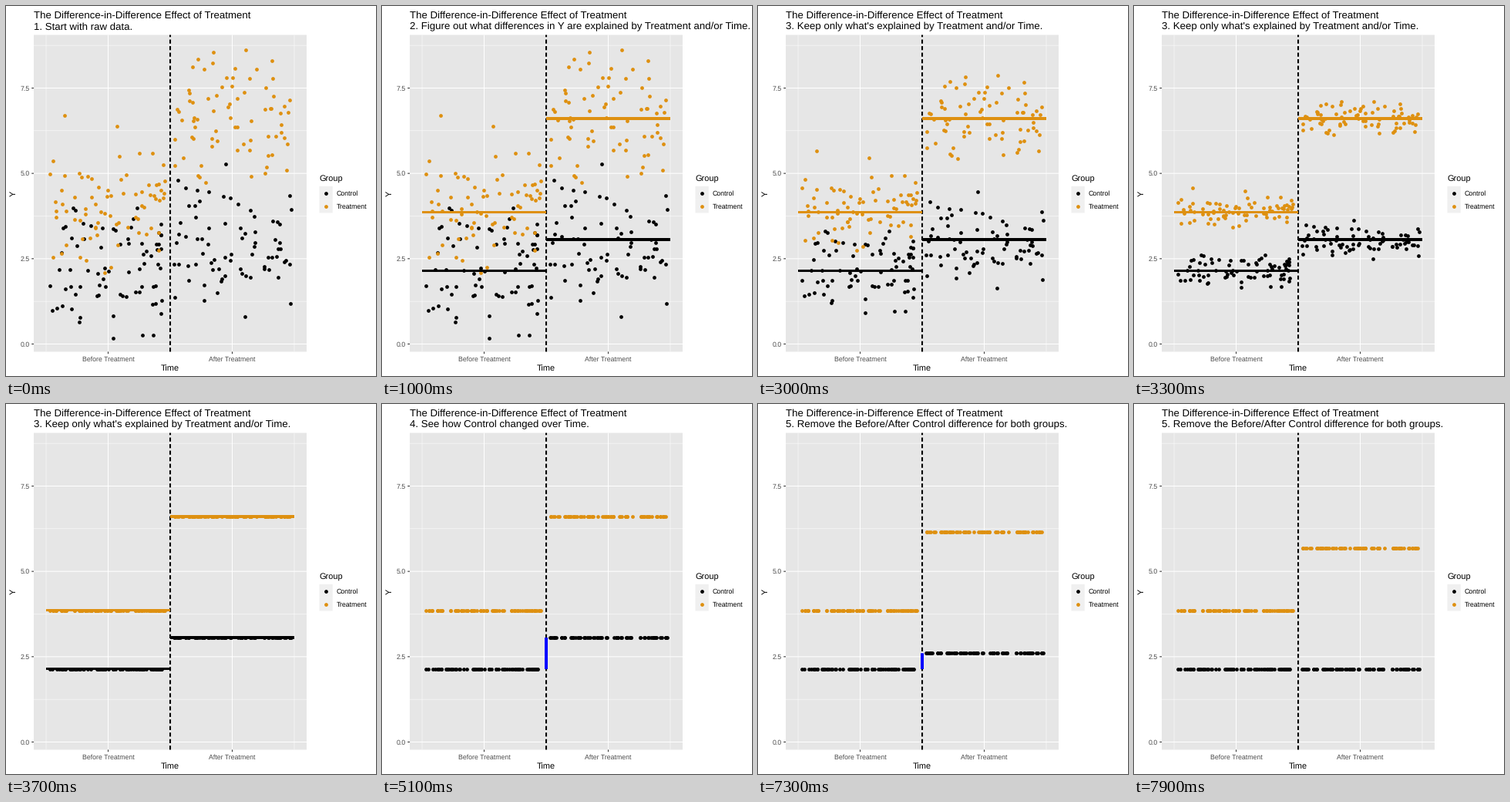
Animation of 480x480 px, one loop 8 s. Source, as a matplotlib script:

```python
import math

import matplotlib.pyplot as plt
import numpy as np
from matplotlib.animation import FuncAnimation
from matplotlib.patches import Rectangle

SIZE, STEP_MS, LOOP_MS, EASE_MS = 480, 100, 8000, 1200
BLACK, ORANGE, BLUE = "#000000", "#DE9010", "#0000FF"
PANEL, KEY, TICK, LABEL = "#E6E6E6", "#F0F0F0", "#333333", "#4D4D4D"
LEFT, RIGHT, TOP, BOTTOM = 35.5, 389.5, 37, 448
CUT, HALF = 212.5, 161

HEADING = "The Difference-in-Difference Effect of Treatment"
CAPTIONS = [
    (0, "1. Start with raw data."),
    (500, "2. Figure out what differences in Y are explained by Treatment and/or Time."),
    (2600, "3. Keep only what's explained by Treatment and/or Time."),
    (4700, "4. See how Control changed over Time."),
    (6800, "5. Remove the Before/After Control difference for both groups."),
]
MEANS_ON, COLLAPSE, MEANS_OFF, GAP_ON, REMOVE = 900, 2600, 4700, 5100, 6800

# Colour, mean height, is after, the two most extreme points
CONTROL_BEFORE, CONTROL_AFTER = 343, 302.5
CLOUDS = [
    (BLACK, CONTROL_BEFORE, False, [(138, 430), (176, 426)]),
    (BLACK, CONTROL_AFTER, True, [(284, 204), (309, 402)]),
    (ORANGE, 267, False, [(75, 141), (143, 155)]),
    (ORANGE, 145.5, True, [(268, 59), (310, 56)]),
]

plt.rcParams.update({"font.family": "Liberation Sans", "path.snap": False,
                     "text.hinting": "none", "lines.solid_capstyle": "butt"})
fig = plt.figure(figsize=(SIZE / 72, SIZE / 72), dpi=72, facecolor="white")
ax = fig.add_axes([0, 0, 1, 1])
ax.axis("off")


def y_pos(value):
    return 438 - 44.27 * value


def line(xs, ys, color, width, order, **style):
    return ax.plot(xs, ys, color=color, lw=width, zorder=order, **style)[0]


def box(x, y, w, h, color):
    ax.add_patch(Rectangle((x, y), w, h, fc=color, ec="none", zorder=0))


def write(x, y, text, size, color=BLACK, ha="left", **style):
    return ax.text(x, y, text, fontsize=size, color=color, ha=ha, **style)


def dots(xs, ys, color):
    return ax.scatter(xs, ys, s=4.8 ** 2, color=color, lw=0, zorder=3)


def draw_chart():
    box(LEFT, TOP, RIGHT - LEFT, BOTTOM - TOP, PANEL)
    for x in (CUT - HALF, CUT, CUT + HALF):
        line([x, x], [TOP, BOTTOM], "white", 0.53, 1)
    for side, name in ((-1, "Before Treatment"), (1, "After Treatment")):
        x = CUT + side * HALF / 2
        line([x, x], [TOP, BOTTOM], "white", 1.07, 2)
        line([x, x], [BOTTOM, BOTTOM + 2.75], TICK, 1.07, 2)
        write(x, 460, name, 8.8, LABEL, "center")
    for value in np.arange(0, 10, 2.5):
        y, minor = y_pos(value), y_pos(value + 1.25)
        line([LEFT, RIGHT], [minor, minor], "white", 0.53, 1)
        line([LEFT, RIGHT], [y, y], "white", 1.07, 2)
        line([LEFT - 2.75, LEFT], [y, y], TICK, 1.07, 2)
        write(30.3, y + 3.1, f"{value:.1f}", 8.8, LABEL, "right")
    line([CUT, CUT], [BOTTOM, TOP], BLACK, 2.1, 4, ls=(0, (2.5, 1.55)),
         dash_capstyle="butt")
    write(CUT, 473, "Time", 11, ha="center")
    write(9.5, 243, "Y", 11, ha="center", va="center", rotation=90)
    write(406, 226.4, "Group", 11)
    for y, name, color in ((242, "Control", BLACK), (259.3, "Treatment", ORANGE)):
        box(406, y - 8.64, 17.28, 17.28, KEY)
        dots([414.6], [y], color)
        write(428.5, y + 3.3, name, 8.8)
    write(35.2, 15, HEADING, 13.2)


def scatter_cloud(rng, mean, after, extremes, total=75):
    count = total - len(extremes)
    start = 56 + HALF * after
    xs = rng.uniform(start, start + 153, count)
    ys = mean + rng.triangular(-92, 0, 92, count)
    return np.vstack([np.column_stack([xs, ys]), extremes])


def sine_ease(now, start):
    t = min(max((now + STEP_MS - start) / EASE_MS, 0), 1)
    return (1 - math.cos(math.pi * t)) / 2


draw_chart()
rng = np.random.default_rng(12)
clouds, mean_lines = [], []
for color, mean, after, extremes in CLOUDS:
    points = scatter_cloud(rng, mean, after, extremes)
    clouds.append((dots(*points.T, color), points, mean, after))
    start = CUT - HALF * (not after)
    # Overlaid copies give the lines solid edges
    mean_lines.append(ax.hlines([mean] * 20, start, start + HALF, color=color,
                                lw=3, capstyle="butt", zorder=5))
gap = line([CUT, CUT], [CONTROL_BEFORE, CONTROL_AFTER], BLUE, 4, 6)
caption = write(35.2, 30, "", 13.2)
ax.set_xlim(-0.5, SIZE - 0.5)
ax.set_ylim(SIZE - 0.5, -0.5)


def update(frame):
    now = frame * STEP_MS
    caption.set_text([text for start, text in CAPTIONS if start <= now][-1])
    squeeze, drop = sine_ease(now, COLLAPSE), sine_ease(now, REMOVE)
    shift = drop * (CONTROL_BEFORE - CONTROL_AFTER)
    for artist, points, mean, after in clouds:
        xs, ys = points.T
        ys = ys + (mean - ys) * squeeze + shift * after
        artist.set_offsets(np.column_stack([xs, ys]))
    for mean_line in mean_lines:
        mean_line.set_visible(MEANS_ON <= now < MEANS_OFF)
    gap.set_ydata([CONTROL_BEFORE + 0.5, CONTROL_AFTER + shift])
    gap.set_visible(now >= GAP_ON and drop < 1)
    return []


anim = FuncAnimation(fig, update, frames=LOOP_MS // STEP_MS, interval=STEP_MS,
                     repeat=True, repeat_delay=0)
plt.show()
```
